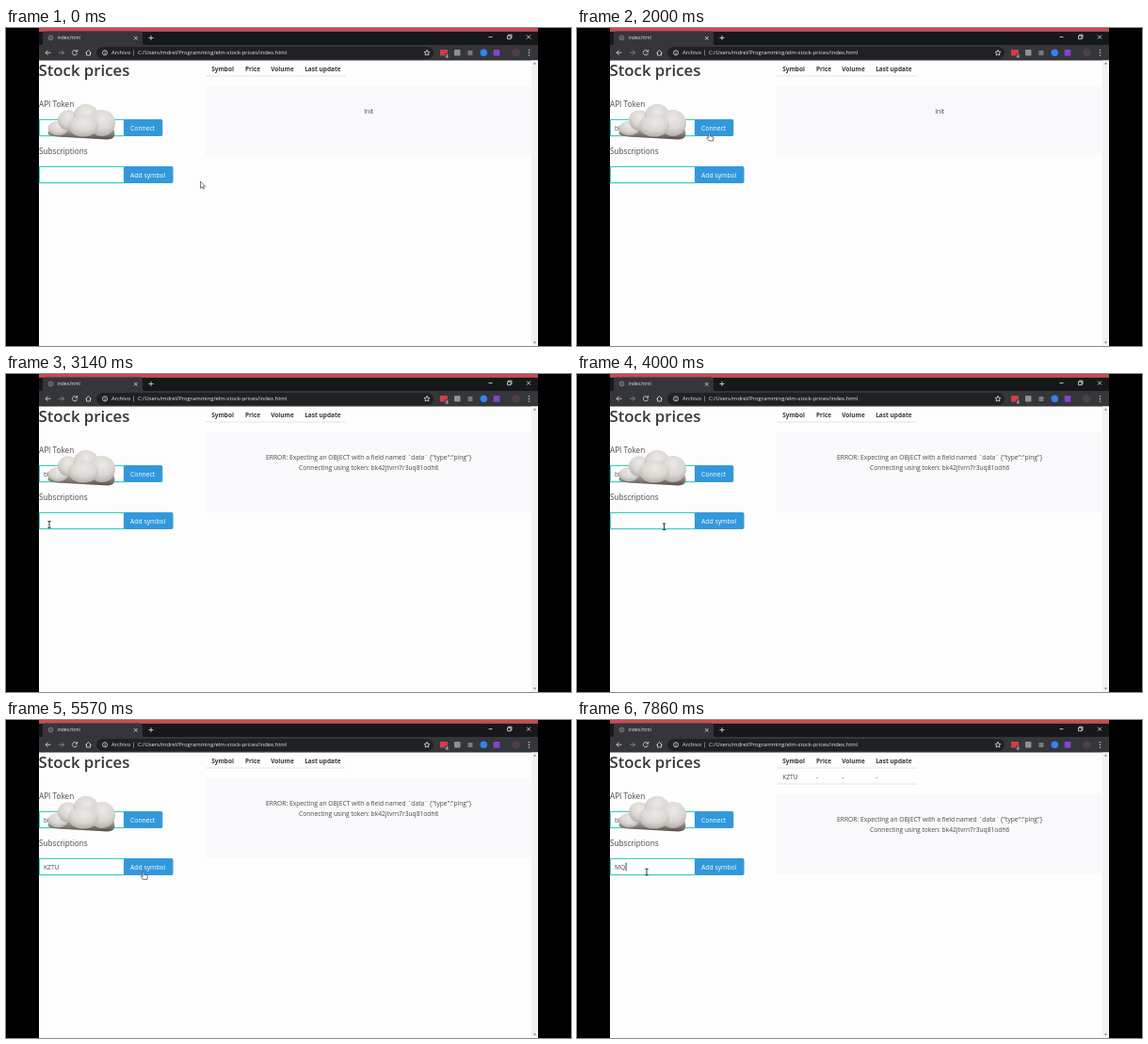
Recreate the animation shown at these times as an HTML page. Size 600 by 338 pixels, loop 8000 ms.

```html
<!DOCTYPE html>
<html lang="en">
<head>
<meta charset="utf-8">
<title>Stock prices</title>
<style>
  html, body { margin: 0; width: 100%; height: 100%; overflow: hidden; background: #000; }
  svg { display: block; width: 100%; height: 100%; }
  text { font: 6.7px "Open Sans", "Noto Sans", sans-serif; fill: #4a4a4a; white-space: pre; }
  .title { font-size: 16.8px; font-weight: 600; fill: #363636; }
  .label { font-size: 8.2px; }
  .head text { font-size: 6.5px; font-weight: 700; fill: #363636; }
  .button text { font-size: 6.8px; fill: #fff; }
  .button rect { fill: #3298dc; }
  .input { fill: #fff; stroke: #3ccfbd; stroke-width: 1.2; }
  .status text { text-anchor: middle; }
  .chrome text { font-size: 5.85px; fill: #e8eaed; }
  .line { fill: none; stroke: #d0d2d5; stroke-width: .9; }
</style>
</head>
<body>
<svg viewBox="0 0 600 338">
  <defs>
    <radialGradient id="puff" cx=".52" cy=".32" r=".75">
      <stop offset="0" stop-color="#ece9e6"/>
      <stop offset=".55" stop-color="#dad6d2"/>
      <stop offset="1" stop-color="#aaa49f"/>
    </radialGradient>
    <linearGradient id="base" x2="0" y2="1">
      <stop offset="0" stop-color="#cfcac5"/>
      <stop offset=".55" stop-color="#99918a"/>
      <stop offset="1" stop-color="#554d47"/>
    </linearGradient>
  </defs>

  <rect x="35" width="530" height="338" fill="#fefdfe"/>
  <g class="chrome">
    <rect x="35" width="530" height="3.5" fill="#d2474f"/>
    <rect x="35" y="3.5" width="530" height="15" fill="#17181a"/>
    <path d="M36 18.5q3 0 3-3V6.500q0-3 3-3h100q3 0 3 3v9q0 3 3 3z" fill="#35363a"/>
    <rect x="35" y="18" width="530" height="16.500" fill="#35363a"/>
    <rect x="96" y="20" width="358" height="13" rx="6.500" fill="#202124"/>
    <circle cx="47.500" cy="10.400" r="2.500" fill="#55575b" stroke="#85878b" stroke-width=".7"/>
    <text x="54.500" y="12.200" style="font-size:4.9px">index.html</text>
    <text x="112" y="28.300">Archivo</text>
    <text x="140" y="28.300">C:/Users/mdrel/Programming/elm-stock-prices/index.html</text>
    <path class="line" d="M136 9l3.500 3.500m0-3.500L136 12.500M151.500 10.500h5m-2.500-2.500v5
      M512.500 9.600h4M532.500 8.200h3.500v3.500h-3.500zM533.500 8.200v-1h3.500v3.500h-1M553 7.600l4 4m0-4l-4 4
      M47.500 26.200h-5.500m2.500-2.500l-2.500 2.500 2.500 2.500
      M84.500 26.500l3-3 3 3M85.500 26v3h4v-3"/>
    <path class="line" stroke-opacity=".5" d="M56 26.200h5.500m-2.500-2.500l2.500 2.500-2.500 2.500M135.500 23.500v6"/>
    <path class="line" d="M75.200 24.800a2.600 2.600 0 1 0 .3 2M75.700 23v2.200h-2.200"/>
    <circle class="line" cx="105" cy="26.300" r="2.500"/>
    <path class="line" d="M105 26v1.600m0-3v.6M447 23.300l.9 2 2.100.2-1.600 1.400.5 2.100-1.900-1.100-1.900 1.100.5-2.100-1.600-1.400 2.100-.2z"/>
    <rect x="461" y="23" width="8" height="6.500" fill="#d63c45"/>
    <rect x="466" y="27" width="4.500" height="5.500" rx="1" fill="#48494d"/>
    <text x="467" y="31.700" style="font-size:4.5px">4</text>
    <rect x="476" y="23" width="6.500" height="6.500" rx="1" fill="#8d9094"/>
    <rect x="490.500" y="24" width="5" height="5" fill="#777a7e"/>
    <circle cx="507.300" cy="26.300" r="3.700" fill="#3285ee"/>
    <rect x="517.700" y="23" width="6.600" height="6.600" fill="#8045cf"/>
    <circle cx="541.500" cy="26.300" r="4.300" fill="#4e3f44"/>
    <path d="M555.500 23v1.300m0 1.400v1.300m0 1.400v1.300" stroke="#d0d2d5" stroke-width="1.300"/>
  </g>

  <rect x="558" y="34.500" width="7" height="303.500" fill="#f3f3f4"/>
  <path d="M560 38.500l1.500-2 1.500 2zM560 333.500l1.500 2 1.500-2z" fill="#777"/>

  <text class="title" x="34.500" y="51.400">Stock prices</text>
  <text class="label" x="35" y="84">API Token</text>
  <text class="label" x="35" y="134">Subscriptions</text>
  <rect class="input" x="35.500" y="97.400" width="90" height="17.200"/>
  <rect class="input" x="35.500" y="147.400" width="90" height="17.200"/>
  <g class="button">
    <rect x="125" y="97" width="41.300" height="18" rx="1.800"/>
    <text x="132" y="108.600">Connect</text>
    <rect x="125" y="147" width="52.500" height="18" rx="1.800"/>
    <text x="132" y="158.600">Add symbol</text>
  </g>
  <text id="token" x="40" y="108.500"></text>
  <text id="symbol" x="40" y="158.500"></text>
  <rect id="caret" width=".9" height="9" fill="#333"/>

  <g class="head">
    <text x="218.200" y="45.500">Symbol</text>
    <text x="254" y="45.500">Price</text>
    <text x="281.200" y="45.500">Volume</text>
    <text x="317.200" y="45.500">Last update</text>
  </g>
  <path d="M212 51h149" stroke="#e2e2e4"/>
  <g id="row">
    <text x="218.200" y="62.500">KZTU</text>
    <text x="254" y="62.500">-</text>
    <text x="281.200" y="62.500">-</text>
    <text x="317.200" y="62.500">-</text>
    <path d="M212 68h149" stroke="#e2e2e4"/>
  </g>
  <g id="status" class="status">
    <rect id="panel" x="212" y="62" width="346" fill="#f9f8fa"/>
    <text id="first" x="385.200" y="91.200"></text>
    <text id="second" x="385.200" y="101.800"></text>
  </g>

  <g id="pointer">
    <path id="arrow" d="M0 0v7.300l1.700-1.500 1.200 2.500 1.200-.6-1.200-2.400h2.300z" fill="#fff" stroke="#444" stroke-width=".7"/>
    <path id="hand" d="M-.8 4.500V.6q.8-1.100 1.600 0v2.700l2.800.8q.9.300.8 1.300l-.5 3H-.5L-2.800 5.300q.6-1.300 2 0z" fill="#fff" stroke="#333" stroke-width=".7"/>
    <path id="beam" d="M-1.700-3.300h3.400M0-3.300v6.600M-1.700 3.300h3.400" stroke="#222" stroke-width=".9"/>
  </g>

  <g id="cloud" fill="url(#puff)">
    <path d="M44.500 112q1-7 9-8l52-3q10 3 10 11 0 6.500-8 6.500l-45-2.500q-18-1-18-4z" fill="url(#base)"/>
    <ellipse cx="55.500" cy="106.500" rx="10.800" ry="7.800"/>
    <circle cx="66" cy="98" r="10.800"/>
    <circle cx="85" cy="94" r="13.300"/>
    <circle cx="102" cy="101" r="14"/>
    <ellipse cx="82" cy="104" rx="16" ry="11.500"/>
  </g>
</svg>
<script>
const $ = id => document.getElementById(id);
const LOOP = 8000, STEP = 1000 / 7;
const TOKEN = 'bk42jtvrn7r3uq81odh6';
const show = (id, on) => $(id).setAttribute('visibility', on ? 'visible' : 'hidden');
const within = (n, ...spans) => spans.some(([from, to]) => n >= from && n < to);

// Pointer path: step, x, y
const path = [
  [0, 206.5, 163], [3, 206.5, 163], [8, 88, 106], [11, 88, 106], [14, 140.5, 111.5],
  [18, 140.5, 111.5], [19, 121, 122.5], [22, 46, 160], [26, 46, 160], [28, 92.5, 162.3],
  [34, 92.5, 162.3], [36, 113, 165.8], [38, 146, 161], [41, 146, 161], [45, 74, 161.5], [56, 74, 161.5]
];

function pointerAt(n) {
  const i = path.findIndex(p => p[0] > n);
  const [a, b] = [path[i - 1], path[i]];
  const f = (n - a[0]) / (b[0] - a[0]);
  return [a[1] + (b[1] - a[1]) * f, a[2] + (b[2] - a[2]) * f];
}

function typed(n) {
  if (n < 41) return 'KZTU'.slice(0, n < 29 ? 0 : n < 30 ? 1 : n < 32 ? 3 : 4);
  return 'MQ'.slice(0, n < 53 ? 0 : n < 54 ? 1 : 2);
}

function drawPointer(n) {
  const [x, y] = pointerAt(n);
  const inRow = (top, bottom) => y >= top && y <= bottom;
  const overRow = inRow(97, 115) || inRow(147, 167);
  const kind = !overRow || x > 177 ? 'arrow' : x > 125 ? 'hand' : 'beam';
  $('pointer').setAttribute('transform', `translate(${x} ${y})`);
  for (const id of ['arrow', 'hand', 'beam']) show(id, id === kind);
}

function draw(time) {
  const n = Math.floor((time % LOOP + 5) / STEP) % 56;
  const connecting = n >= 17, failed = n >= 21, added = n >= 41;
  const message = 'Connecting using token: ' + TOKEN;

  $('token').textContent = n >= 12 ? TOKEN : '';
  $('symbol').textContent = typed(n);
  $('first').textContent = failed
    ? 'ERROR: Expecting an OBJECT with a field named `data` {"type":"ping"}'
    : connecting ? message : 'Init';
  $('second').textContent = failed ? message : '';
  $('panel').setAttribute('height', failed ? 85 : 74);
  $('status').setAttribute('transform', `translate(0 ${added ? 17 : 0})`);
  show('row', added);

  const field = n < 20 ? 'token' : 'symbol';
  $('caret').setAttribute('x', 40.4 + $(field).getComputedTextLength());
  $('caret').setAttribute('y', n < 20 ? 101.5 : 151.5);
  show('caret', within(n, [8, 10], [24, 26], [29, 36], [44, 48], [52, 56]));
  drawPointer(n);
}

function tick(now) {
  draw(now);
  requestAnimationFrame(tick);
}
draw(0);
requestAnimationFrame(tick);
</script>
</body>
</html>
```
